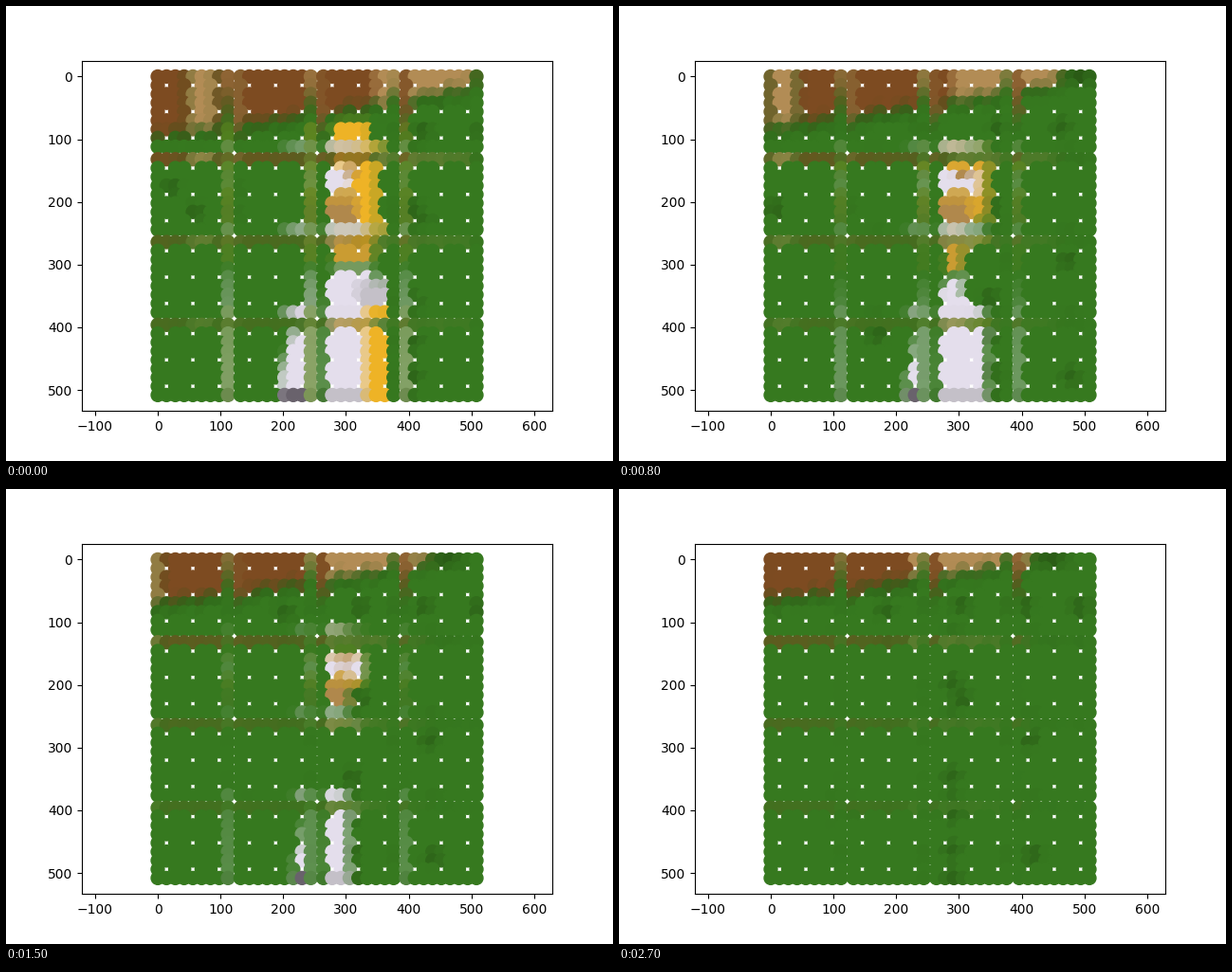
A matplotlib script that plays this animation: 640x480 px, repeating every 2.8 s.

```python
import numpy as np
import matplotlib.pyplot as plt
from matplotlib.animation import FuncAnimation

TILES, SIDE, STEP, PERIOD = 4, 9, 14, 132
N = TILES * SIDE
FRAMES, INTERVAL, HOLD, SCROLL_END = 28, 100, 13, 17

GREEN, DARK = (54, 121, 31), (40, 86, 20)
BROWN, TAN = (125, 75, 33), (178, 140, 85)
WHITE, GREY, SHADOW = (228, 222, 236), (196, 192, 200), (105, 98, 108)
YELLOW, GOLD, SKIN = (238, 179, 38), (202, 156, 50), (176, 136, 76)

idx = np.arange(N)
pos = PERIOD * (idx // SIDE) + STEP * (idx % SIDE)
cols, rows = np.meshgrid(idx, idx)
hole = idx % SIDE % 3 == 1
shown = ~(hole[:, None] & hole[None, :])

# Dark tufts in scrolling scene cells, the last ones in a vertical trail
TUFTS = [(4.4, 15.2), (1.7, 12.4), (15.6, 28.8), (36.8, 33.5), (35.8, 6.4),
         (29, 6.4), (20.8, 7), (36.4, 20.8), (29, 16.6), (42, 6.5)]
TUFTS += [(28, v) for v in (14.8, 25, 29, 33, 36)]


def after(step, start, rate):
    """Grows by rate per step once start is reached."""
    return rate * max(step - start, 0)


def cover(lo, hi, x):
    """Share of the unit cell centred on x that lies between lo and hi."""
    return np.clip(np.minimum(hi, x + 0.5) - np.maximum(lo, x - 0.5), 0, 1)


def near(x, center, reach=1.0):
    return np.clip(1 - abs(x - center) / reach, 0, 1)


def blend(img, color, weight):
    w = weight[..., None]
    img[:] = img * (1 - w) + np.asarray(color, float) * w


def box(img, color, x0, x1, y0, y1):
    blend(img, color, cover(x0, x1, cols) * cover(y0, y1, rows))


def draw_scene(img, step):
    t = min(step, SCROLL_END)
    shift = 0.47 * t
    for u, v in TUFTS:
        dist = np.hypot(cols - u + shift, rows - v + shift / 8)
        blend(img, DARK, 0.55 * np.clip(1.4 - dist, 0, 1))

    left = 3.6 - 0.45 * t
    right, end = 24 - 0.5 * t, 34.8 - 0.36 * t
    blend(img, DARK, 0.9 * near(cols, end + 2, 3) * near(rows, 0, 2))

    tree = np.empty_like(img)
    tree[:] = BROWN
    blend(tree, TAN, cover(left, left + 3.1, cols) + cover(right, end, cols))
    for edge in (left, left + 3.1, end):
        blend(tree, DARK, 0.35 * near(cols, edge))

    horizon = 7.6 - 0.12 * cols - 0.0012 * cols ** 2 - 0.13 * t
    horizon = horizon + 0.25 * np.sin(2.3 * (cols + shift))
    inside = cover(-9, end, cols)
    blend(img, tree, np.clip(horizon - rows, 0, 1) * inside)
    blend(img, DARK, 0.55 * near(rows + 0.4, horizon, 1.4) * inside)


def draw_dress(img, step):
    torso = 23.8 - after(step, 4, 0.66)
    skirt = 24.2 - after(step, 7, 0.47)
    right = torso + (skirt - torso) * np.clip((rows - 24.5) / 3, 0, 1)
    left = 15.4 - 1.7 * np.exp(-step / 3) + after(step, 17, 0.6)
    left = left + 0.25 * np.maximum(33 - rows, 0) + 0.5 * np.maximum(26 - rows, 0)

    box(img, GOLD, 19.4, torso, 18.5, 20.6 + 0.12 * step)
    box(img, WHITE, left, right, 21.2 + 0.12 * step, 35.5)
    box(img, GREY, left, right, 34.5, 35.5)
    box(img, SHADOW, left, np.minimum(right, 17), 34.5, 35.5)
    # Sleeve and the long strand beside the skirt
    box(img, GREY, 22 + 0.3 * step, 25.5 - after(step, 4, 0.5), 22.7, 25.5)
    box(img, YELLOW, 23 + 0.22 * step, 25.5 - after(step, 5, 0.6),
        26 + 0.8 * step, 35.5)


def draw_head(img, step):
    left = 18.5 + after(step, 17, 0.25)
    right = min(24.3 + 0.25 * step, 25.8 - 0.22 * step)
    width = right - left
    if width <= 0:
        return
    top = min(5.4 + 0.5 * step, 9.5 + 0.06 * step)
    chin = 17 - after(step, 13, 0.3)
    brow = 10 + 0.06 * step
    fade = min(step / 14, 1)
    hair = np.array(YELLOW) * (1 - fade) + np.array(GOLD) * fade

    box(img, hair, left + 0.9, right - 0.9, top, 9.5)
    box(img, hair, left, right, max(top, 9.5), 17 - after(step, 5, 0.3))
    box(img, WHITE, left, left + width * min(0.5 + 0.04 * step, 1), brow, 13.4)
    box(img, SKIN, left + 0.35 * width, left + 0.65 * width, brow, brow + 1)
    box(img, GOLD, left, left + 0.6 * width, 12.7, 14.3)
    box(img, SKIN, left, left + 0.6 * width, 14, chin)


def spread_edges(img):
    """Tile edges show the mean of everything beyond them."""
    out = img.copy()
    for b in range(SIDE, N, SIDE):
        out[b - 1] = img[b - 1:].mean(axis=0)
        out[b] = img[:b].mean(axis=0)
    mixed = out.copy()
    for b in range(SIDE, N, SIDE):
        out[:, b - 1] = mixed[:, b - 1:].mean(axis=1)
        out[:, b] = mixed[:, :b].mean(axis=1)
    return out


def cell_colors(frame):
    step = frame if frame < HOLD else frame - 1
    img = np.empty((N, N, 3))
    img[:] = GREEN
    draw_scene(img, step)
    draw_dress(img, step)
    draw_head(img, step)
    return np.clip(spread_edges(img)[shown] / 255, 0, 1)


fig, ax = plt.subplots(figsize=(6.4, 4.8), dpi=100)
dots = ax.scatter(pos[cols[shown]], pos[rows[shown]], s=100, c=cell_colors(0))
half = 254 * 1.1 * 496 / 369.6
ax.set_xlim(254 - half, 254 + half)
ax.set_ylim(533.4, -25.4)


def update(frame):
    colors = cell_colors(frame)
    dots.set_facecolor(colors)
    dots.set_edgecolor(colors)
    return dots,


anim = FuncAnimation(fig, update, frames=FRAMES, interval=INTERVAL,
                     repeat=True, repeat_delay=0)
plt.show()
```
